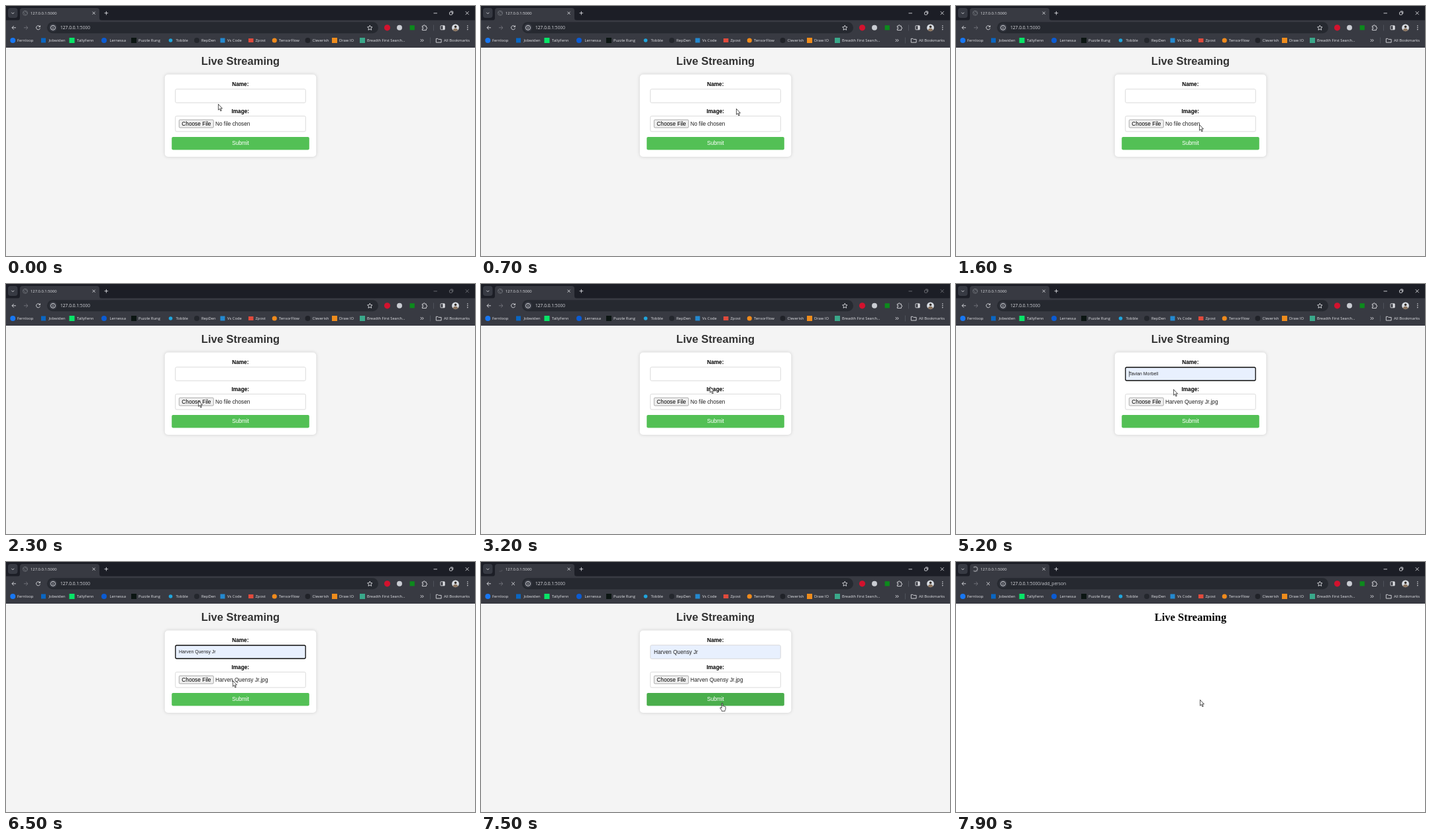
An HTML page for the animation above (8 s loop, 708 px wide and 378 px high).

```html
<!DOCTYPE html>
<html lang="en">
<head>
<meta charset="utf-8">
<title>Live Streaming</title>
<style>
html, body { margin: 0; width: 100%; height: 100%; overflow: hidden; background: #f4f4f4; }
svg { display: block; width: 708px; height: 378px; }
text { white-space: pre; }
.ui { font: 5.85px "Open Sans", "Noto Sans", sans-serif; fill: #e3e4e8; }
.url { font-size: 6.65px; }
.dimtext { fill: #c8cad0; }
.form { font: 8.28px "Liberation Sans", Arial, sans-serif; fill: #222; }
.mid { text-anchor: middle; }
.label { font-weight: bold; fill: #000; }
.title { font-size: 16.5px; font-weight: bold; fill: #333; }
.serif { font: bold 16.55px "Liberation Serif", "Times New Roman", serif; fill: #000; }
.small { font-size: 6.9px; }
.line { fill: none; stroke: #dcdde1; stroke-width: .9; }
.off { stroke: #75777e; }
.box { fill: #fff; stroke: #d2d2d2; stroke-width: .8; }
.card { fill: #fff; filter: drop-shadow(0 0 2.6px rgba(0,0,0,.16)); }

/* Hard state changes, all on one 8 s clock */
.step { animation: 8s step-end infinite; }
.page { animation-name: page; }
.next { animation-name: next; }
.idle { animation-name: idle; }
.busy { animation-name: busy; }
.wait { animation-name: wait; }
.window { animation-name: window; }
.nofile { animation-name: nofile; }
.file { animation-name: file; }
.field { animation-name: field; }
.ring { animation-name: ring; }
.caret { animation-name: caret; }
.first { animation-name: first; }
.second { animation-name: second; }
.filled { animation-name: filled; }
.submit { fill: #53c055; animation-name: submit; }
.arrow { animation-name: arrow; }
.hand { animation-name: hand; }
@keyframes page { 0% { opacity: 1 } 96.25%, to { opacity: 0 } }
@keyframes next { 0% { opacity: 0 } 96.25%, to { opacity: 1 } }
@keyframes idle { 0% { opacity: 1 } 90%, to { opacity: 0 } }
@keyframes busy { 0% { opacity: 0 } 90%, to { opacity: 1 } }
@keyframes wait { 0% { opacity: 0 } 90% { opacity: .22 } 96.25%, to { opacity: 0 } }
@keyframes window { 0% { opacity: 1 } 27.5% { opacity: .45 } 55%, to { opacity: 1 } }
@keyframes nofile { 0% { opacity: 1 } 56.25%, to { opacity: 0 } }
@keyframes file { 0% { opacity: 0 } 56.25%, to { opacity: 1 } }
@keyframes field { 0% { fill: #fff } 63.75%, to { fill: #e8f0fe } }
@keyframes ring { 0% { opacity: 0 } 61.25% { opacity: 1 } 90%, to { opacity: 0 } }
@keyframes caret { 0% { opacity: 0 } 61.25% { opacity: 1 } 67.5%, to { opacity: 0 } }
@keyframes first { 0% { opacity: 0 } 63.75% { opacity: 1 } 77.5%, to { opacity: 0 } }
@keyframes second { 0% { opacity: 0 } 77.5% { opacity: 1 } 82.5%, to { opacity: 0 } }
@keyframes filled { 0% { opacity: 0 } 82.5%, to { opacity: 1 } }
@keyframes submit { 0% { fill: #53c055 } 86.25%, to { fill: #4aae4c } }
@keyframes arrow { 0% { opacity: 1 } 86.25% { opacity: 0 } 96.25%, to { opacity: 1 } }
@keyframes hand { 0% { opacity: 0 } 86.25% { opacity: 1 } 96.25%, to { opacity: 0 } }

.spin { transform-origin: 29px 10.7px; animation: spin .8s linear infinite; }
.back { animation-direction: reverse; animation-duration: 1.6s; }
@keyframes spin { to { transform: rotate(360deg) } }

.pointer { animation: move 8s linear infinite; }
@keyframes move {
  0%, 1.25% { transform: translate(320px, 148px) }
  5% { transform: translate(345px, 168px) }
  8.75%, 10% { transform: translate(385px, 155px) }
  15%, 16.25% { transform: translate(366px, 182px) }
  20%, 22.5% { transform: translate(367px, 179px) }
  27.5%, 31.25% { transform: translate(290px, 176px) }
  38.75%, 40% { transform: translate(346px, 155px) }
  42.5% { transform: translate(207px, 151px) }
  48.75%, 52.5% { transform: translate(147px, 109px) }
  57.5%, 58.75% { transform: translate(352px, 199px) }
  61.25%, 62.5% { transform: translate(336px, 137px) }
  63.75% { transform: translate(330px, 152px) }
  65% { transform: translate(328px, 159px) }
  68.75% { transform: translate(338px, 166px) }
  71.25%, 76.25% { transform: translate(339px, 167px) }
  78.75%, 82.5% { transform: translate(342px, 179px) }
  87.5%, 95% { transform: translate(364px, 213px) }
  98.75%, to { transform: translate(368px, 208px) }
}
</style>
</head>
<body>
<svg viewBox="0 0 708 378">
  <rect width="708" height="378" fill="#f4f4f4"/>

  <g class="step page form">
    <text class="title mid" x="354" y="89">Live Streaming</text>
    <rect class="card" x="239.7" y="103.5" width="228.6" height="124.5" rx="5"/>

    <text class="label mid" x="353.8" y="121">Name:</text>
    <rect class="box step field" x="255.7" y="125.7" width="196.6" height="20.6" rx="2"/>
    <rect class="step ring" x="255.8" y="126" width="196.4" height="20" rx="2" fill="none" stroke="#101010" stroke-width="1.3"/>
    <text class="small step first" x="261" y="138.4">Tavian Morbell</text>
    <text class="small step second" x="261" y="138.4">Harven Quensy Jr</text>
    <text class="step filled" x="261" y="138.7">Harven Quensy Jr</text>
    <path class="step caret" d="M261.4 131.5v9" stroke="#000" stroke-width=".6"/>

    <text class="label mid" x="353.8" y="161.5">Image:</text>
    <rect class="box" x="255.7" y="166.4" width="196.6" height="23.4" rx="2"/>
    <rect x="261.3" y="172" width="52" height="12" rx="1.5" fill="#efefef" stroke="#767676" stroke-width=".6"/>
    <text class="mid" x="287.4" y="180.8" fill="#000">Choose File</text>
    <text class="step nofile" x="316" y="180.8">No file chosen</text>
    <text class="step file" x="316" y="180.8">Harven Quensy Jr.jpg</text>

    <rect class="step submit" x="250.2" y="198" width="207.6" height="19.5" rx="2"/>
    <text class="mid" x="354" y="210.4" style="fill:#fff">Submit</text>
  </g>

  <g class="step next">
    <rect y="63" width="708" height="315" fill="#fff"/>
    <text class="serif mid" x="354" y="89">Live Streaming</text>
  </g>

  <!-- Tab strip -->
  <rect width="708" height="22" fill="#1c1e26"/>
  <rect y="21.5" width="708" height="41.5" fill="#383a42"/>
  <rect x="3" y="3" width="14.5" height="15" rx="4" fill="#373a43"/>
  <path class="line" d="M8.3 9.8l2 2 2-2"/>
  <path d="M17 22q4 0 4-4V7q0-4 4-4h112q4 0 4 4v11q0 4 4 4z" fill="#383a42"/>
  <g class="step idle" fill="none" stroke="#7b7e86" stroke-width=".7">
    <circle cx="29" cy="10.7" r="3.5"/>
    <path d="M25.8 9.5q2 .2 2.5 2t1.5 2.2M28.5 7.3q.2 2 2 2t1.5 2.5"/>
  </g>
  <g class="step wait"><path class="line spin back" d="M29 7.2a3.5 3.5 0 0 1 3.5 3.5"/></g>
  <g class="step next"><path class="line spin" d="M29 7.2a3.5 3.5 0 1 1-3.5 3.5"/></g>
  <text class="ui" x="37" y="12.9">127.0.0.1:5000</text>
  <path class="line" d="M130.6 8.7l4 4m0-4l-4 4M148.6 10.7h5.6m-2.8-2.8v5.6"/>
  <g class="step window line">
    <path d="M645.5 10.9h5.4M693.7 8.2l5 5m0-5l-5 5"/>
    <rect x="669.6" y="9.2" width="4" height="4" rx=".7"/>
    <path d="M671 8h3q.8 0 .8.8v3"/>
  </g>

  <!-- Toolbar -->
  <rect x="62" y="24.3" width="500" height="17" rx="8.5" fill="#262930"/>
  <path class="line" d="M15 32.8H9m2.8-2.8L9 32.8l2.8 2.8"/>
  <path class="line off" d="M27 32.8h6m-2.8-2.8l2.8 2.8-2.8 2.8"/>
  <g class="step idle line">
    <path d="M51.2 31.2a3 3 0 1 0 .3 2.4"/>
    <path d="M51.6 29.4v2.2h-2.2"/>
  </g>
  <path class="step busy line" d="M46.2 30.4l4.8 4.8m0-4.8l-4.8 4.8"/>
  <circle cx="71" cy="32.8" r="6" fill="#383b44"/>
  <g class="line">
    <circle cx="71" cy="32.8" r="3.5"/>
    <path d="M71 32.4v2.2M71 30.7v.9"/>
    <path d="M549.3 29.2l1.1 2.4 2.6.3-1.9 1.8.5 2.6-2.3-1.3-2.3 1.3.5-2.6-1.9-1.8 2.6-.3z"/>
  </g>
  <text class="ui url" x="82" y="35.2">127.0.0.1<tspan class="dimtext">:5000</tspan><tspan class="dimtext step next">/add_person</tspan></text>
  <circle cx="575.5" cy="32.8" r="4.6" fill="#d3122e"/>
  <circle cx="594" cy="32.8" r="4" fill="#c9ccd2"/>
  <rect x="609.6" y="29.2" width="7.2" height="7.2" fill="#0c8a1c"/>
  <path class="line" d="M628.4 30.2h2v-.5a1 1 0 0 1 2 0v.5h2v2.2h.4a1 1 0 0 1 0 2h-.4v2.2h-6v-2.2h.6a1 1 0 0 0 0-2h-.6z"/>
  <path d="M645.5 28.5v9M640.5 47.5v9" stroke="#5a5d66" stroke-width=".7"/>
  <rect class="line" x="656" y="29.8" width="6.2" height="6" rx=".6"/>
  <path d="M659.4 29.8h2.8v6h-2.8z" fill="#dcdde1"/>
  <circle cx="678.5" cy="32.8" r="5.4" fill="#d8dde3"/>
  <path d="M674.8 36.7q.4-3 3.7-3t3.7 3q-3.700 3-7.400 0z" fill="#8c7560"/>
  <circle cx="678.6" cy="31.4" r="1.8" fill="#3b3430"/>
  <g fill="#dcdde1">
    <circle cx="696.8" cy="30" r=".8"/><circle cx="696.8" cy="32.8" r=".8"/><circle cx="696.8" cy="35.600" r=".8"/>
  </g>

  <!-- Bookmarks -->
  <circle cx="10.300" cy="52" r="4" fill="#1877f2"/>
  <rect x="53" y="48.500" width="7" height="7" fill="#0a66c2"/>
  <rect x="95.500" y="48" width="8" height="8" fill="#08e567"/>
  <circle cx="148" cy="52" r="4" fill="#0b5bd3"/>
  <rect x="189" y="48" width="8" height="8" fill="#0b1512"/>
  <circle cx="248.500" cy="52" r="2.800" fill="#20a5dc"/>
  <circle cx="288" cy="52" r="4" fill="#24272d"/>
  <rect x="323.500" y="48.500" width="7" height="7" fill="#2489d0"/>
  <rect x="366" y="49" width="7.500" height="6" fill="#e04a3c"/>
  <circle cx="405.300" cy="52" r="3.600" fill="#f08a1c"/>
  <circle cx="455.500" cy="52" r="4" fill="#202228"/>
  <rect x="492" y="48" width="8" height="8" fill="#ef8c1c"/>
  <rect x="534" y="48" width="8" height="8" fill="#3aa88a"/>
  <g class="ui">
    <text x="17" y="54.100">Fernloop</text>
    <text x="64.500" y="54.100">Jobwiden</text>
    <text x="107" y="54.100">TallyFenn</text>
    <text x="156.500" y="54.100">Lernessa</text>
    <text x="200" y="54.100">Puzzle Rung</text>
    <text x="256.500" y="54.100">Tobble</text>
    <text x="295" y="54.100">RepDen</text>
    <text x="334" y="54.100">Vs Code</text>
    <text x="376.500" y="54.100">Zpost</text>
    <text x="412" y="54.100">TensorFlow</text>
    <text x="462.500" y="54.100">Cleverish</text>
    <text x="503" y="54.100">Draw IO</text>
    <text x="545" y="54.100" style="font-size:5.65px">Breadth First Search...</text>
    <text x="661" y="54.100">All Bookmarks</text>
  </g>
  <path class="line" d="M625.700 50l2 2-2 2m2.600-4l2 2-2 2"/>
  <path class="line" d="M649.300 49.300h2.600l1 1.100h4.200v4.700h-7.800z"/>

  <g class="pointer" stroke="#111" stroke-width=".75" stroke-linejoin="round" fill="#fff">
    <path class="step arrow" d="M.4.4v8.800l2-1.800 1.500 3.400 1.400-.6-1.500-3.300h2.700z"/>
    <path class="step hand" d="M-.7 7.800V1.200a.8.800 0 0 1 1.600 0v3.700q.8-.6 1.500.2 1-.4 1.500.4 1.300-.3 1.300 1v2.400q0 1.500-1 2.500v1.200h-4.700v-1.100l-2.500-3.400q-.4-1.200.7-1.100z"/>
  </g>
</svg>
</body>
</html>
```
